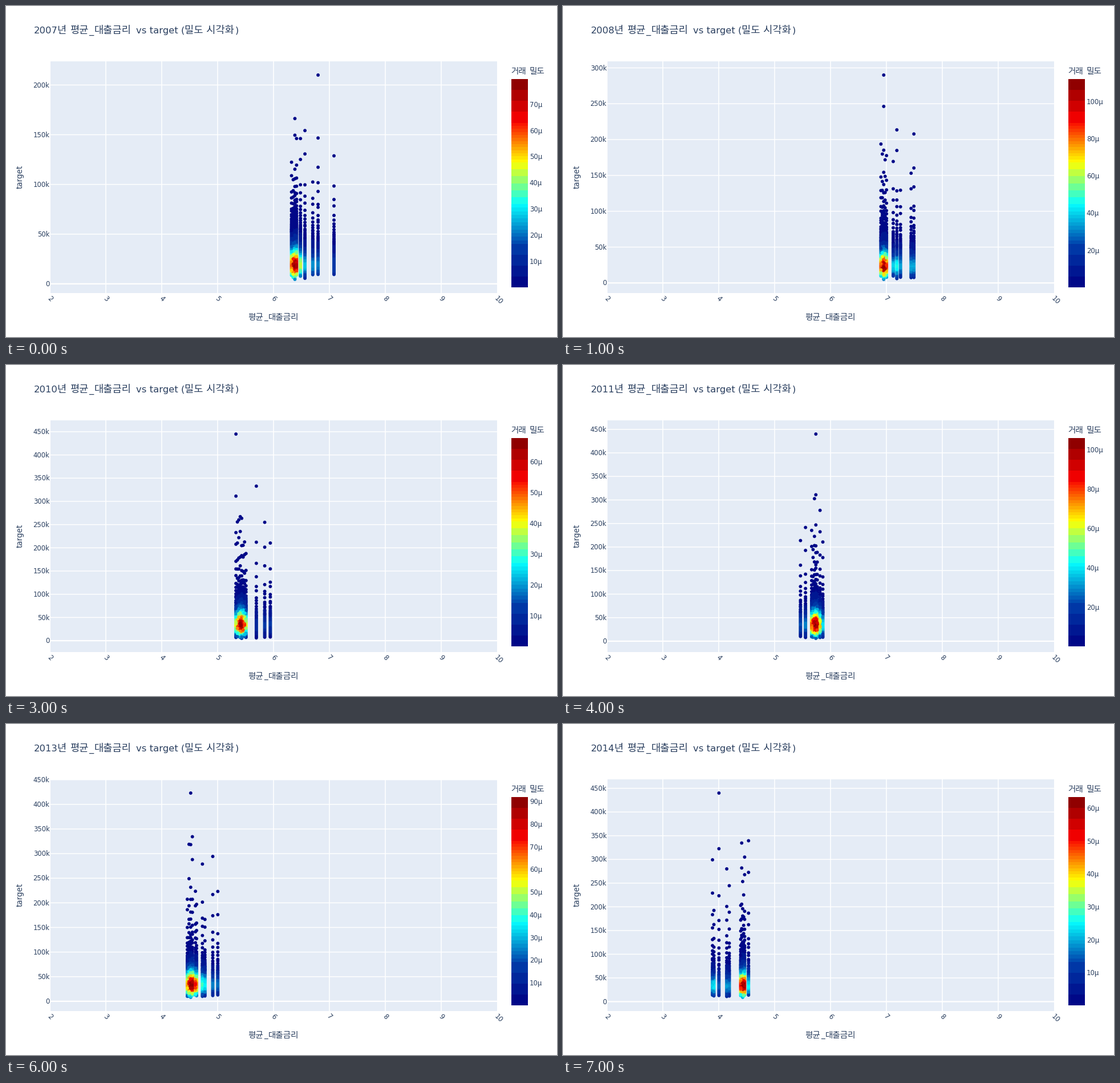
Recreate the animation shown at these times as a matplotlib script. Size 966 px wide and 580 px high, loop 8000 ms.

```python
import numpy as np
import matplotlib.pyplot as plt
from matplotlib.animation import FuncAnimation

W, H, DPI = 966, 580, 100
PX = 72 / DPI
INK, PANEL = "#2a3f5f", "#e5ecf6"
LEFT, RIGHT, TOP, BOTTOM = 77.5, 861, 97, 502.5
DOT_TOP, DOT_LOW = 121, 479
BAR_TOP, BAR_LOW = 128, 493
LATIN, HANGUL = 11.6, 14.6

plt.rcParams["font.family"] = ["DejaVu Sans", "Noto Sans CJK JP"]

# Evenly spaced jet stops, shown in bands: wide at the ends, narrow between.
JET = np.array([(0, 0, 131), (0, 60, 170), (5, 255, 255),
                (255, 255, 0), (250, 0, 0), (128, 0, 0)]) / 255
EDGES = np.concatenate([np.linspace(a, b, n, endpoint=False) for a, b, n in [
    (0, .208, 4), (.208, .4, 11), (.4, .6, 6), (.6, .79, 13), (.79, 1, 4)]] + [[1]])
MIDS = (EDGES[1:] + EDGES[:-1]) / 2
BANDS = np.column_stack([np.interp(MIDS, np.linspace(0, 1, 6), ch) for ch in JET.T])


def x_px(rate):
    return LEFT + (rate - 2) * (RIGHT - LEFT) / 8


def make_chart(year, low, high, dense, mode, tallest, *groups):
    """groups: evenly spaced columns (first rate, last rate, count);
    mode: most common value; tallest: rate of the column with the maximum."""
    rng = np.random.default_rng(year)
    scale = (DOT_LOW - DOT_TOP) / (high - low)
    rates = np.concatenate([np.linspace(*g) for g in groups])

    # Crowded columns are hotter.
    gaps = rates[:, None] - rates
    crowd = np.exp(-(gaps / 0.06) ** 2 / 2).sum(axis=1)
    peaks = (crowd / crowd.max()) ** 1.25
    tall = np.abs(rates - tallest).argmin()

    parts = []
    for i, (rate, peak) in enumerate(zip(rates, peaks)):
        base = low + (0 if peak == 1 else rng.uniform(1, 5))
        solid = mode + 12 + 25 * peak ** 0.5
        top = high if i == tall else high * rng.uniform(0.38, 0.8)
        n = 10 + int(16 * peak ** 0.5)
        rank = np.arange(1, n + 1) - 0.7 * rng.random(n)
        rank[0] = 1
        tail = solid * (top / solid) ** (1 - np.log(rank) / np.log(n))
        ys = np.append(np.arange(base, solid, 1.8 / scale), tail)
        parts.append(np.column_stack([np.full_like(ys, rate), ys,
                                      np.full_like(ys, peak)]))
    x, v, peak = rng.permutation(np.concatenate(parts)).T

    z = v / mode - 1
    heat = peak * np.where(z > 0, 1 / np.cosh(z * 1.77), np.exp(-(z / .48) ** 2 / 2))
    band = np.clip(np.searchsorted(EDGES, heat, "right") - 1, 0, len(BANDS) - 1)
    zero = DOT_LOW + low * scale
    return dict(year=year, x=x_px(x), y=zero - v * scale, color=BANDS[band],
                zero=zero, scale=scale, dense=dense)


charts = [
    make_chart(2007, 4.5, 210, 79.6, 18.5, 6.79, (6.32, 6.41, 4),
               (6.48, 6.56, 2), (6.70, 6.795, 2), (7.08, 7.08, 1)),
    make_chart(2008, 5, 290, 112, 23, 6.96, (6.90, 7.00, 5),
               (7.12, 7.25, 3), (7.44, 7.49, 2)),
    make_chart(2009, 6, 315, 52.4, 34, 5.82, (5.40, 5.61, 7), (5.82, 5.91, 3)),
    make_chart(2010, 5, 445, 67.7, 34, 5.32, (5.325, 5.505, 8),
               (5.69, 5.69, 1), (5.84, 5.94, 2)),
    make_chart(2011, 6, 440, 106, 34, 5.73, (5.46, 5.55, 2),
               (5.66, 5.76, 5), (5.81, 5.86, 2)),
    make_chart(2012, 7, 353, 36.7, 32, 5.71, (4.835, 4.835, 1), (4.94, 4.975, 2),
               (5.13, 5.215, 2), (5.45, 5.45, 1), (5.58, 5.58, 1), (5.66, 5.79, 4)),
    make_chart(2013, 8, 423, 91.9, 33, 4.52, (4.455, 4.545, 4),
               (4.60, 4.62, 2), (4.725, 4.77, 2), (4.91, 5.00, 2)),
    make_chart(2014, 9, 440, 63.4, 33, 4.00, (3.885, 3.91, 2), (4.00, 4.00, 1),
               (4.14, 4.185, 2), (4.39, 4.46, 5), (4.53, 4.53, 1)),
]

fig = plt.figure(figsize=(W / DPI, H / DPI), dpi=DPI, facecolor="white")
ax = fig.add_axes([0, 0, 1, 1])


def label(x, y, text, size, **kw):
    ax.text(x, y, text, size=size * PX, color=INK, va="baseline", **kw)


def line(xs, ys, width=1.5, **kw):
    ax.plot(xs, ys, color="white", lw=width * PX, solid_capstyle="butt", **kw)


def axis_frame():
    ax.fill([LEFT, RIGHT, RIGHT, LEFT], [TOP, TOP, BOTTOM, BOTTOM], PANEL, lw=0)
    for rate in range(2, 11):
        x = x_px(rate)
        if 2 < rate < 10:
            line([x, x], [TOP, BOTTOM], 1.6)
        label(x - 5.3, 512.8, str(rate), LATIN, rotation=-45,
              rotation_mode="anchor")
    label(424.5, 550, "평균", HANGUL)
    label(451.7, 550, "_", 13.5)
    label(460, 550, "대출금리", HANGUL)
    label(28.5, 299, "target", 13.5, rotation=90, ha="center",
          rotation_mode="anchor")


def title(year):
    latin, hangul = 16.4, 17.7
    for x, text, size in [
            (48.5, str(year), latin), (89.5, "년", hangul), (112.5, "평균", hangul),
            (145, "_", latin), (154.5, "대출금리", hangul),
            (228.5, "vs target (", latin), (313, "밀도 시각화", hangul),
            (402, ")", latin)]:
        label(x, 48, text, size)


def value_grid(zero, scale):
    for v in range(0, 500, 50):
        y = zero - v * scale
        if y < TOP - 0.5:
            break
        line([LEFT, RIGHT], [y, y], 1.5 if v else 2.3, snap=False)
        label(76.5, y + 4.2, f"{v}k" if v else "0", LATIN, ha="right")


def color_bar(dense):
    span = BAR_LOW - BAR_TOP
    ax.bar(886, -np.diff(EDGES) * span, 29, BAR_LOW - EDGES[:-1] * span,
           align="edge", color=BANDS, linewidth=0, antialiased=False)
    label(885.5, 119.3, "거래", HANGUL)
    label(917.7, 119.3, "밀도", HANGUL)
    step = 20 if dense > 100 else 10 if dense > 40 else 5
    for v in range(step, int(dense) + 1, step):
        label(917.8, BAR_LOW - v / dense * span + 4.7, f"{v}µ", LATIN)


def draw(i):
    c = charts[i]
    ax.clear()
    ax.axis("off")
    axis_frame()
    title(c["year"])
    value_grid(c["zero"], c["scale"])
    ax.scatter(c["x"], c["y"], s=(5.9 * PX) ** 2, c=c["color"],
               linewidths=0, zorder=3)
    color_bar(c["dense"])
    ax.set(xlim=(0, W), ylim=(H, 0))


anim = FuncAnimation(fig, draw, frames=len(charts), init_func=lambda: None,
                     interval=1000, repeat=True, repeat_delay=0)
plt.show()
```
